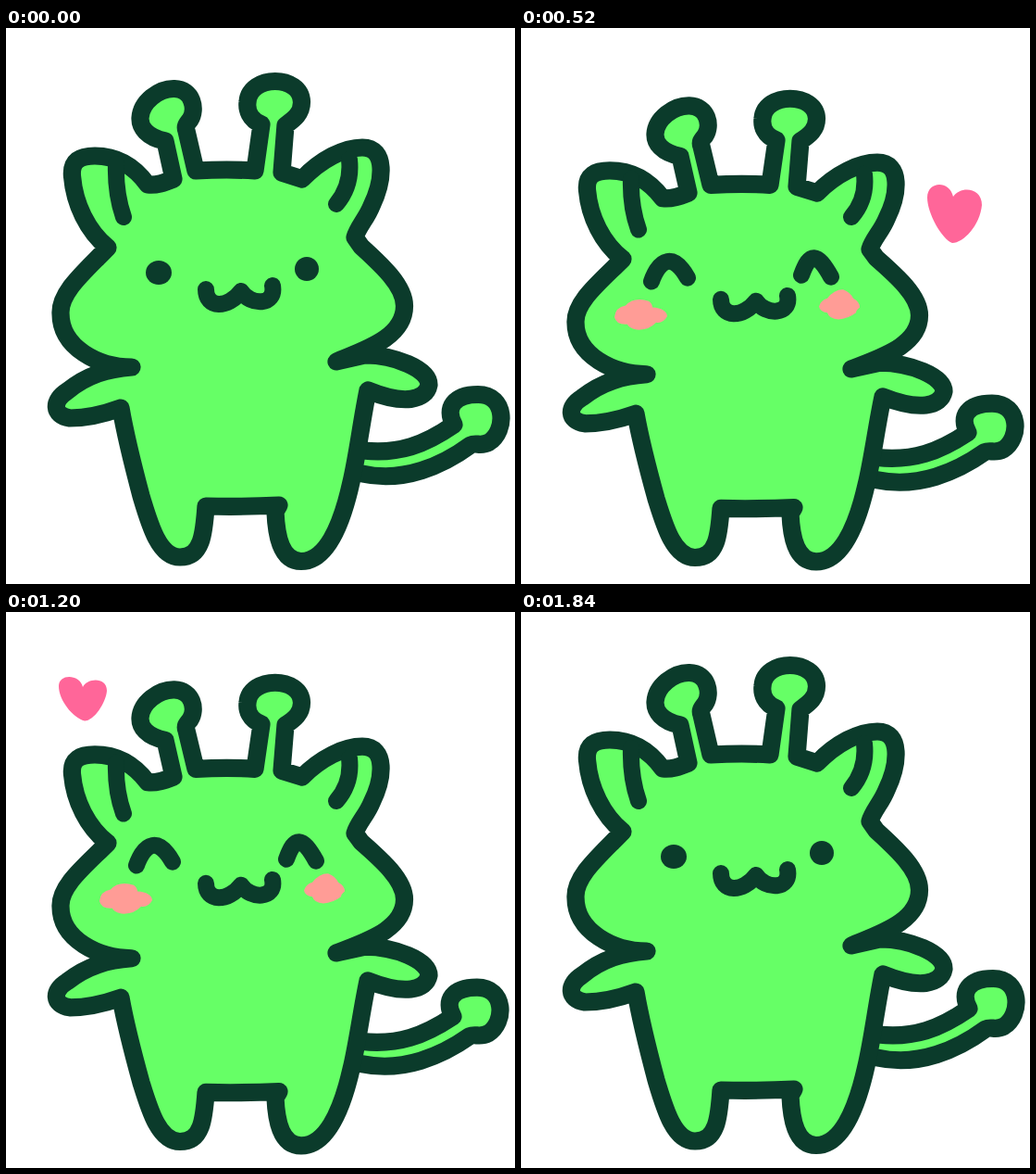
An HTML page for the animation above (2 s loop, 550 px wide and 600 px high).

```html
<!DOCTYPE html>
<html lang="en">
<head>
<meta charset="utf-8">
<title>Happy critter</title>
<style>
  html, body { margin: 0; width: 100%; height: 100%; overflow: hidden; background: #fff; }
  svg { display: block; }
  .line { fill: none; stroke: #0b3b2b; stroke-width: 18; stroke-linecap: round; stroke-linejoin: round; }
  .line * { vector-effect: non-scaling-stroke; }
  .skin { fill: #66ff66; stroke-width: 19.2; }
  .ink { fill: #0b3b2b; }
  .blush { fill: #ff9c96; }
</style>
</head>
<body>
<svg width="550" height="600" viewBox="0 0 550 600">
  <g id="critter" class="line">
    <path id="tail" class="skin" d="M386 456C425 460 452 450 484 428C474 410 484 395.500 510 395.500C541 395.500 541 435 522 447C513 452 508 447 502 450C472 472 430 491 385 481"/>
    <path class="skin" d="M110 237C88 219 74 190 71.500 160C70 143 80 138 96 138C122 138 140 151 153 169C163 170 171 167 181 163
      L172 122C152 118 144.500 107 145 97C146 80 165 65 182 65.500C202 66 206 88 199 99C195 104 193 106 195 111L205 154
      Q240 152 269 154L276 104C263 99 260 88 261 80C263 50 319 50 319.500 80C319.500 92 312 98 302 105L298 156L320 163
      C340 142 365 129 385 129C412 129 408 165 395 192C390 205 380 215 377 226L384 236
      C405 255 430.500 278 430.500 300C430.500 335 385 348 357 360L388 353C420 353 457 368 457 385C454 402 430 407 391 391
      C384 425 380 460 373 490C362 540 345 575.500 319 575.500C296 575.500 292 545 291 522L295 515Q255 517 216 516
      C214 545 212 571 188 571C165 571 155 535 146 505C138 475 130 445 124 410
      C105 417 85 421 69 421C50 418 50 402 66 392C88 374 110 368 136 366C100 366 59 345 59 308C58 285 85 263 110 237Z"/>
    <path d="M119 147Q118 178 127 204M371 142Q374 170 357 190"/>
    <path d="M216 282C216 303 240 303 254 284C264 300 292 300 288 278"/>
    <g id="calm" class="ink" stroke="none">
      <ellipse cx="165" cy="264" rx="14" ry="13"/>
      <ellipse cx="325" cy="260" rx="13" ry="13"/>
    </g>
    <g id="happy">
      <path d="M141 262C150 236 165 230 180 258M303 255C312 229 320 229 335 257"/>
      <path class="blush" stroke="none" d="M101 302Q102 291 113 289Q122 279 138 284Q142 287 142 291Q157 292 158 301Q154 309 146 308Q138 317 125 316Q116 314 115 310Q103 311 101 302Z
        M322 290Q324 283 331 281Q338 271 348 271Q356 274 359 281Q366 285 366 291Q362 294 362 297Q353 304 343 304.500Q333 304 331 297Q323 296 322 290Z"/>
    </g>
  </g>
  <path id="right" d="M466 232C455 228 439 200 439 183C439 165 463 164 467 182C475 170 498 172 498 191C496 213 478 232 466 232Z"/>
  <path id="left" d="M85 117.500C72 114 57 95 57 80C57 66 80 67 83 81C88 71 109 70 109 85C108 98 95 117.500 85 117.500Z"/>
</svg>
<script>
const LOOP = 2000, GROUND = 585;
const PINK = "#ff6699", FADED = "#bd9dab";
const $ = id => document.getElementById(id);

// Held poses: start time, [squash, tail shift x, tail shift y]
const rest = [1, 0, 0], dip = [0.983, 0, 1], low = [0.9645, -1, 3], bounce = [0.988, -2, 5];
const poses = [[0, rest], [200, dip], [360, low], [680, bounce], [1000, low],
  [1360, bounce], [1680, dip], [1840, rest]];

// Hearts: start time, [colour, dx, dy]
const gone = ["none", 0, 0];
const hearts = {
  right: [[0, gone], [440, [FADED, 0, 0]], [520, [PINK, 0, 0]], [680, [PINK, 2, -43]],
    [840, [PINK, 5, -86]], [920, [FADED, 5, -86]], [1000, gone]],
  left: [[0, gone], [1120, [FADED, 0, 0]], [1200, [PINK, 0, 0]], [1360, [PINK, 0, -43]],
    [1520, [PINK, 0, -51]], [1600, [FADED, 0, -51]], [1680, gone]]
};

const at = (steps, t) => steps.findLast(step => step[0] <= t)[1];
const show = (id, on) => $(id).setAttribute("visibility", on ? "visible" : "hidden");

function draw(t) {
  const [squash, dx, dy] = at(poses, t);
  $("critter").setAttribute("transform", `translate(0 ${GROUND * (1 - squash)}) scale(1 ${squash})`);
  $("tail").setAttribute("transform", `translate(${dx} ${dy})`);

  const happy = t >= 360 && t < 1680;
  show("happy", happy);
  show("calm", !happy);

  for (const id in hearts) {
    const [colour, x, y] = at(hearts[id], t);
    $(id).setAttribute("fill", colour);
    $(id).setAttribute("transform", `translate(${x} ${y})`);
  }
}

const start = performance.now();
function tick() {
  draw((performance.now() - start) % LOOP);
  requestAnimationFrame(tick);
}
tick();
</script>
</body>
</html>
```
